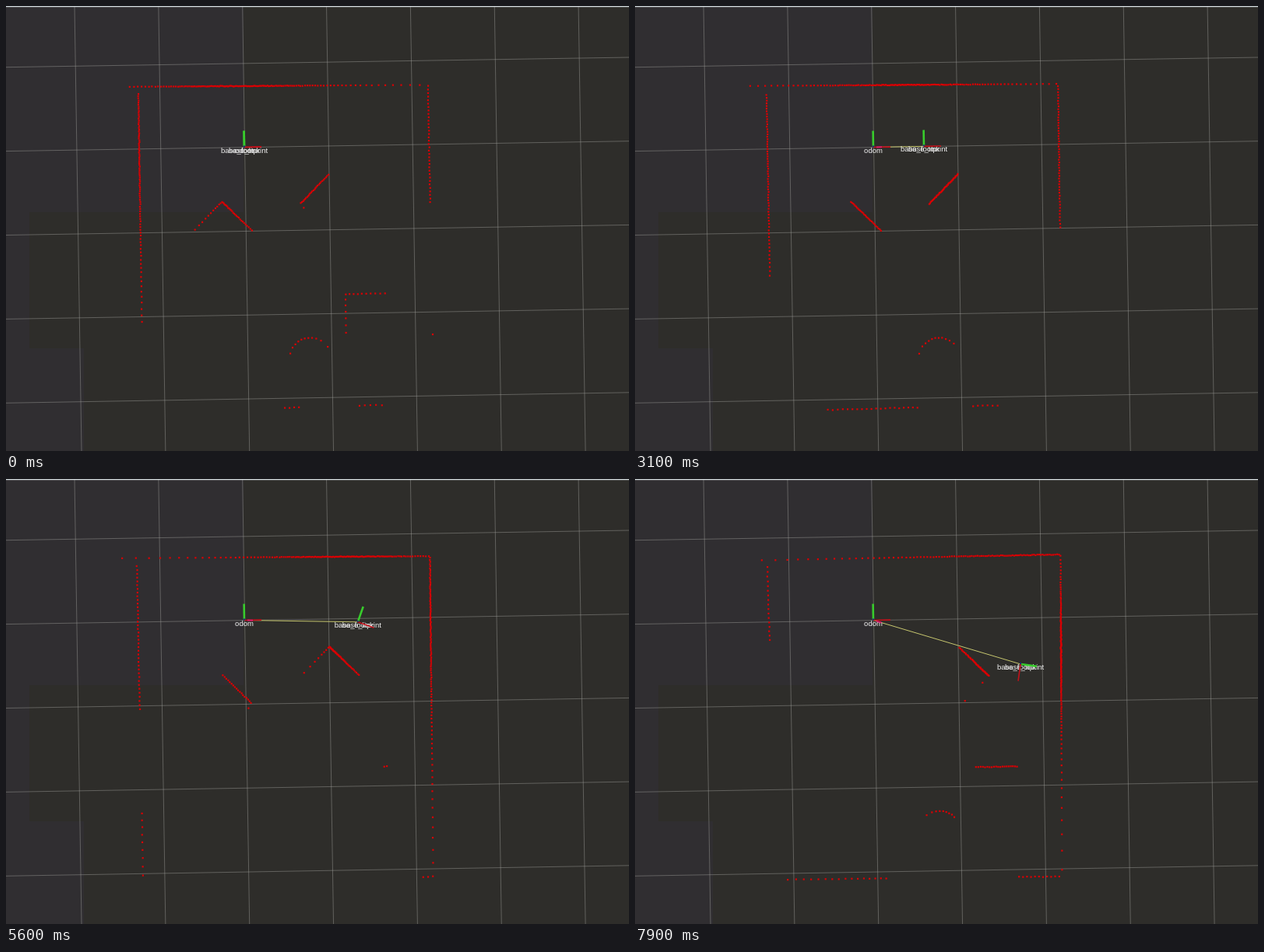
Recreate the animation shown at these times as an HTML page with a canvas. Size 800 by 572 pixels, loop 8000 ms.

```html
<!DOCTYPE html>
<html>
<head>
<meta charset="utf-8">
<style>
html, body { margin: 0; width: 100%; height: 100%; overflow: hidden; background: #2e2d2a; }
canvas { display: block; }
</style>
</head>
<body>
<canvas id="stage" width="800" height="572"></canvas>
<script>
const ctx = document.getElementById('stage').getContext('2d');
const RAD = Math.PI / 180;
const ODOM = { x: 306, y: 181.5, dir: -RAD };
const START = 1.1, SPEED = 32.5;           // seconds, pixels per second
const SCAN_LAG = 0.3, SENSOR_BACK = 7;
const clamp = v => Math.min(1, Math.max(0, v));

// Straight ahead, then a gentle right turn that tightens
const heading = t => (-1 + 24 * Math.max(0, t - 4.75) + 26 * Math.max(0, t - 7)) * RAD;

function poseAt(t) {
  let { x, y } = ODOM;
  const n = 80, dt = Math.max(0, t - START) / n;
  for (let i = 0; i < n; i++) {
    const a = heading(START + (i + 0.5) * dt);
    x += SPEED * dt * Math.cos(a);
    y += SPEED * dt * Math.sin(a);
  }
  return { x, y, dir: heading(t) };
}

const chain = pts => pts.slice(1).map((p, i) => [...pts[i], ...p]);

function polygon(x, y, r, n, turn) {
  const corner = i => {
    const a = turn + i * 2 * Math.PI / n;
    return [x + r * Math.cos(a), y + r * Math.sin(a)];
  };
  return chain(Array.from({ length: n + 1 }, (_, i) => corner(i)));
}

const obstacles = [
  ...polygon(278, 290, 38.5, 4, -RAD),
  ...polygon(416, 254, 38.5, 4, -RAD),
  ...polygon(464, 397.5, 39, 4, 44 * RAD),
  ...polygon(391, 453.5, 27, 32, 0)
];

// The mapped room slides with odometry drift and twists in the tight turn
function wallsAt(t) {
  const drift = clamp(t / 7), twist = clamp((t - 7) / 0.9);
  return chain([
    [131, 104 - 2.5 * drift + 3.6 * twist],
    [541.8 + 3.2 * drift + 1.5 * twist, 101.5 - 3 * drift - 1.5 * twist],
    [549.5 - drift, 511],
    [176.3 + 7 * twist, 522 - 2 * drift - 5 * twist],
    [170 - 2.4 * drift + 2.2 * twist, 112]
  ]);
}

function castRay(x, y, dx, dy, lines) {
  let best = Infinity;
  for (const [x1, y1, x2, y2] of lines) {
    const ex = x2 - x1, ey = y2 - y1, det = dx * ey - dy * ex;
    const r = ((x1 - x) * ey - (y1 - y) * ex) / det;
    const k = ((x1 - x) * dy - (y1 - y) * dx) / det;
    if (r > 0 && k >= 0 && k <= 1 && r < best) best = r;
  }
  return best;
}

function noise(n) {
  const v = Math.sin(n * 12.9898) * 43758.5453;
  return v - Math.floor(v) - 0.5;
}

// One dot per degree, refreshed five times a second
function drawScan(t) {
  const step = Math.floor(t * 5 + 0.01);
  const { x: px, y: py, dir } = poseAt(step / 5 - SCAN_LAG);
  const x = px - SENSOR_BACK * Math.cos(dir), y = py - SENSOR_BACK * Math.sin(dir);
  const lines = [...wallsAt(t), ...obstacles];
  ctx.fillStyle = '#da0004';
  for (let i = 0; i < 360; i++) {
    const a = dir + i * RAD, dx = Math.cos(a), dy = Math.sin(a);
    const r = castRay(x, y, dx, dy, lines);
    if (r > 430) continue;
    const d = r + noise(i + step * 360) * 0.9;
    ctx.fillRect(x + dx * d - 1.1, y + dy * d - 1.1, 2.2, 2.2);
  }
}

function line(x1, y1, x2, y2, color, width) {
  ctx.strokeStyle = color;
  ctx.lineWidth = width;
  ctx.beginPath();
  ctx.moveTo(x1, y1);
  ctx.lineTo(x2, y2);
  ctx.stroke();
}

function drawGrid() {
  ctx.fillStyle = '#2e2d2a';
  ctx.fillRect(0, 0, 800, 572);
  ctx.fillStyle = '#302e31';
  ctx.fillRect(0, 0, 305, 265);
  ctx.fillRect(0, 265, 30, 175);
  ctx.fillRect(0, 440, 100, 132);
  const color = 'rgba(160,160,155,0.45)';
  for (let i = 0; i < 7; i++) line(88 + i * 107.85, 0, 97 + i * 107.85, 572, color, 1);
  for (let i = 0; i < 5; i++) line(0, 78.7 + i * 107.9, 800, 66 + i * 107.7, color, 1);
  ctx.fillStyle = '#d3dbde';
  ctx.fillRect(0, 0, 800, 1.3);
}

function drawAxes({ x, y, dir }) {
  const c = Math.cos(dir), s = Math.sin(dir);
  line(x, y, x + 22 * c, y + 22 * s, '#c4101a', 1.6);
  line(x + s, y - c, x + 21 * s, y - 21 * c, '#38cc2c', 2.6);
  ctx.fillStyle = '#1c2a78';
  ctx.fillRect(x - 1, y - 2, 2, 2);
}

function label(text, { x, y }) {
  ctx.fillText(text, x, y + 7);
}

function draw(t) {
  const robot = poseAt(t);
  const dx = robot.x - ODOM.x, dy = robot.y - ODOM.y, dist = Math.hypot(dx, dy);
  drawGrid();
  drawScan(t);
  if (dist > 2) line(ODOM.x, ODOM.y, robot.x, robot.y, '#c6c66e', 1);
  ctx.font = '9.5px "Liberation Sans", Arial, sans-serif';
  ctx.textAlign = 'center';
  ctx.fillStyle = '#f4f4f4';
  label('odom', ODOM);
  label('base_link', robot);
  label('base_footprint', robot);
  drawAxes(ODOM);
  drawAxes(robot);
  if (dist > 14) {
    const at = d => [ODOM.x + dx * d / dist, ODOM.y + dy * d / dist];
    line(...at(4), ...at(11), '#d81868', 2);
  }
}

function frame(now) {
  draw(Math.floor(now % 8000 / 100) / 10);
  requestAnimationFrame(frame);
}
requestAnimationFrame(frame);
</script>
</body>
</html>
```
